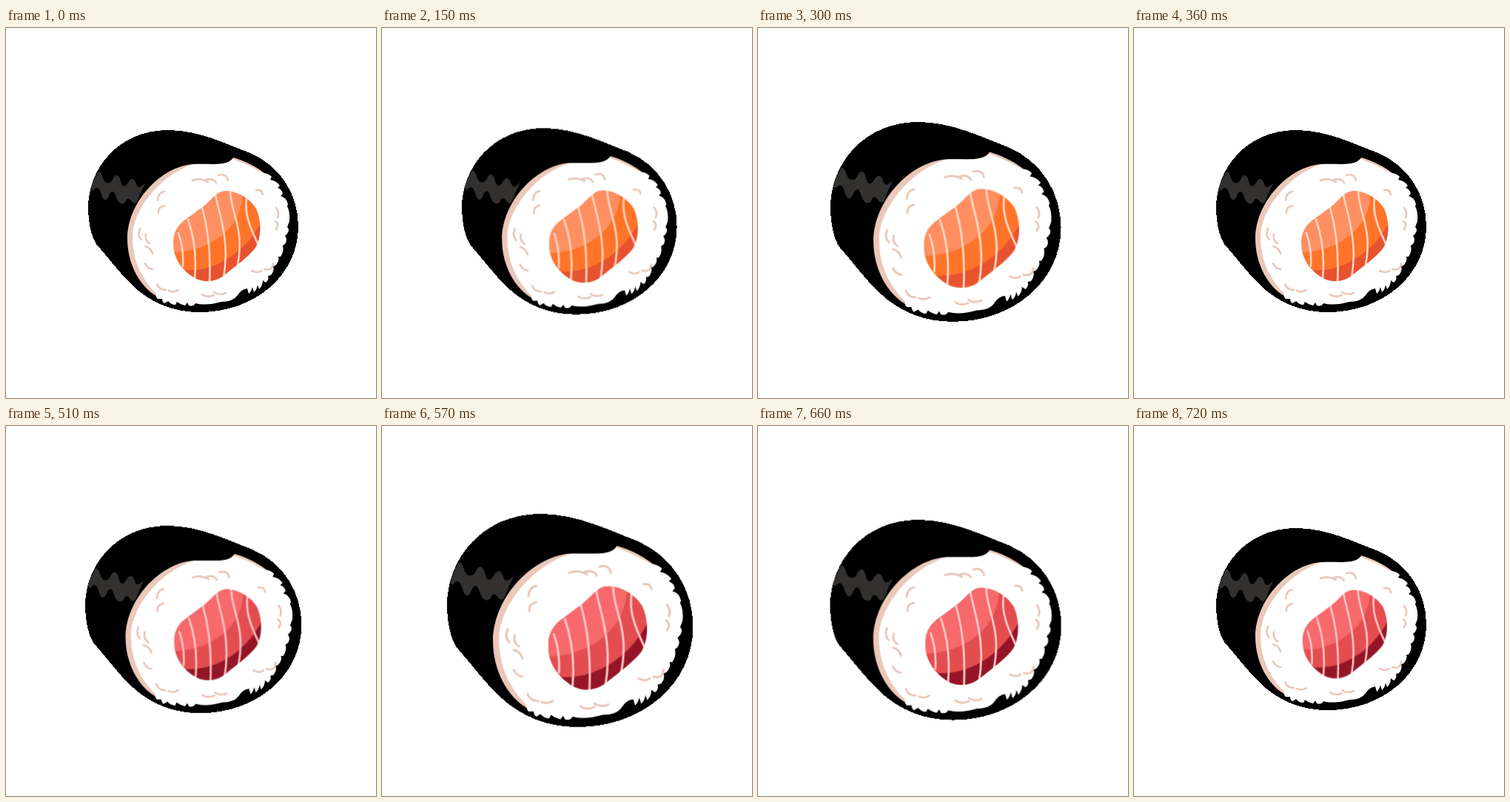
Animation, 500 px wide and 500 px high, one loop 840 ms. Source, as an HTML page:

```html
<!DOCTYPE html>
<html lang="en">
<head>
<meta charset="utf-8">
<title>Maki pulse</title>
<style>
  html, body { margin: 0; width: 100%; height: 100%; overflow: hidden; background: #fff; }
  svg { display: block; width: 100%; height: 100%; }
  path { stroke-linecap: round; stroke-linejoin: round; }
  #roll { transform-origin: 246.5px 251px; }
  .nori { shape-rendering: crispEdges; }
  .grains { fill: none; stroke: #e9c8bb; stroke-width: 2.6; }

  .fish { transform-origin: 285px 281.5px; animation: swap 840ms step-end -1ms infinite; }
  .light { fill: var(--light); }
  .mid { fill: var(--mid); }
  .dark { fill: var(--dark); }
  .veins { fill: none; stroke: var(--vein); stroke-width: 2.6; }

  /* salmon for the first half, tuna for the second */
  @keyframes swap {
    0% {
      --light: #ff8f60; --mid: #ff7429; --dark: #e8532f; --vein: #ffd5c2;
      transform: none;
    }
    50%, 100% {
      --light: #f7696c; --mid: #e44d4f; --dark: #951526; --vein: #ffc9c9;
      transform: scale(.973, .98);
    }
  }
</style>
</head>
<body>
<svg viewBox="0 0 500 500">
  <defs>
    <clipPath id="cut">
      <path d="M226 290C226 275 233 265 245 257L268 240C280 230 285 220 298 220C315 221 331 232 338 244C346 262 345 284 337 297C328 309 310 322 295 334C283 344 265 345 252 336C236 325 226 310 226 290Z"/>
    </clipPath>
  </defs>
  <g id="roll">
    <path class="nori" d="M111 243C111 190 152 138 219 138C262 138 300 158 330 169C372 187 395 226 395 268C395 335 335 384 262 384C228 384 198 373 172 349C153 331 139 311 122 292C115 282 111 262 111 243Z"/>
    <path fill="#33312f" d="M126 194Q129 196 131 203Q134 211 140 209C145 207 145 198 150 199C156 201 154 214 160 214C165 212 166 204 171 204C177 206 175 216 181 215L188 210Q182 222 177 235Q173 240 169 233Q164 227 161 236Q156 240 152 235C148 230 148 221 144 221C139 221 139 234 133 232C128 229 129 217 123 216Q120 216 118 220L114 217Q119 205 124 194Z"/>

    <path fill="#eac8ba" d="M252 184C208 188 164 236 164 285C164 320 182 350 203 362L260 300L354 200C340 188 322 179 307 175Q302 184 282 184Z"/>
    <path fill="#fff" d="M254 184C275 183 298 187 306 177C324 183 340 192 347 196Q354 196 359 201L357 205Q365 206 370 213L367 216Q373 218 374 224L371 227Q379 229 381 238L380 241Q384 248 383 261L380 269Q384 272 380 278L377 281Q381 286 377 292L374 294Q376 302 371 309L368 309Q370 315 364 321L361 322Q363 328 358 334L354 335Q356 340 351 344L347 341Q347 348 342 353L340 347Q339 354 335 357L333 350Q331 357 328 359L326 352Q318 353 313 361Q307 370 291 370Q270 376 256 372Q253 377 247 375L245 371L242 375Q236 374 231 370L229 374Q223 374 219 369L214 372Q211 370 211 366L205 366Q202 363 203 359C184 340 171 315 171 283C171 246 208 198 254 184Z"/>
    <path class="grains" d="M252 206Q262 202 273 208M268 206Q279 201 284 209M287 199Q298 196 300 206
      M205 233Q206 222 214 221M206 250Q205 242 214 240
      M338 219Q346 218 347 225M365 243Q370 249 367 256M364 261Q370 265 365 272
      M181 271Q177 281 183 286M189 278Q187 287 194 291M188 295Q196 297 198 305M188 318Q191 325 198 326
      M204 346Q207 354 216 354M220 355Q227 358 233 354
      M265 360Q271 365 281 361M281 357Q289 362 297 358
      M332 328Q340 332 345 328M349 326Q360 329 361 318"/>

    <g class="fish">
      <g clip-path="url(#cut)">
        <path class="mid" d="M220 215H350V350H220Z"/>
        <path class="light" d="M220 303C275 305 325 268 319 215H220Z"/>
        <path class="dark" d="M230 326C278 334 322 306 345 262L355 350H230Z"/>
        <path class="veins" d="M233 277C238 291 240 305 239 322M246 259C254 282 258 306 255 338M265 243C274 274 277 305 275 345M283 225C288 252 303 287 294 338M303 219C303 250 324 271 312 325M326 226C320 250 332 274 341 293"/>
      </g>
    </g>
  </g>
</svg>
<script>
  const LOOP = 840, STEPS = 28;

  const pulse = (t, start, length, size) => {
    const p = (t - start) / length;
    return p > 0 && p < 1 ? size * (1 - Math.cos(2 * Math.PI * p)) / 2 : 0;
  };

  const poses = Array.from({ length: STEPS + 1 }, (_, i) => {
    const t = i * LOOP / STEPS;
    const scale = 1 + pulse(t, 123, 237, .19) + pulse(t, 480, 240, .2);
    return { offset: i / STEPS, transform: `scale(${scale})`, easing: 'step-end' };
  });

  document.getElementById('roll').animate(poses, { duration: LOOP, delay: -1, iterations: Infinity });
</script>
</body>
</html>
```
